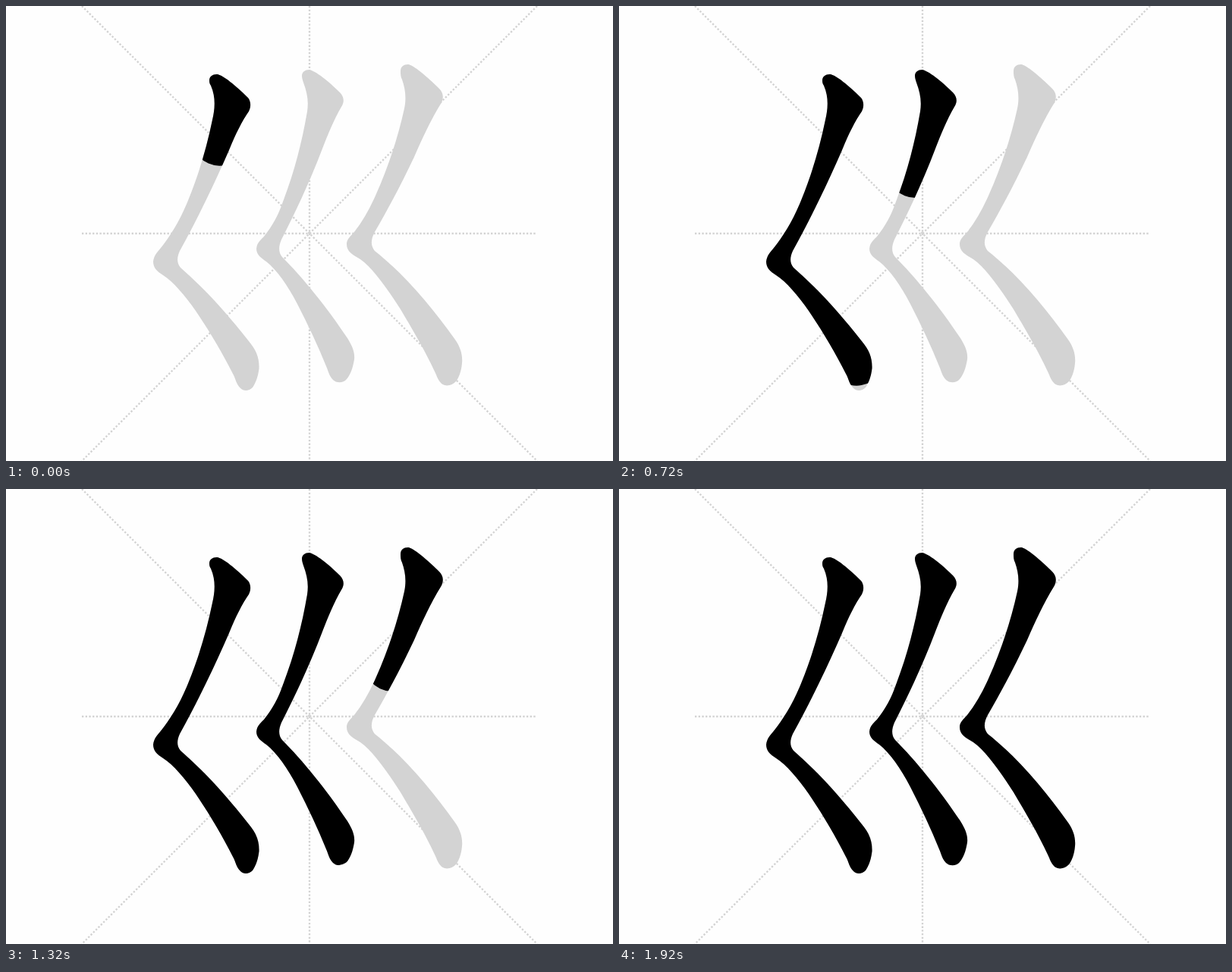
An HTML page for the animation above (1.98 s loop, 800 by 600 pixels).

```html
<!DOCTYPE html>
<html lang="en">
<head>
<meta charset="utf-8">
<title>Stroke order</title>
<style>
  html, body { margin: 0; width: 100%; height: 100%; overflow: hidden; background: #fefefe; }
  svg { display: block; width: 800px; height: 600px; }
  .guides { fill: none; stroke: #d3d3d3; stroke-width: 2.344; stroke-dasharray: 2.34375; }
  .shapes { fill: #d3d3d3; }

  /* Each brush runs along a stroke's spine and is clipped to its outline. */
  .brush {
    fill: none;
    stroke: #000;
    stroke-width: 75;
    stroke-linecap: round;
    stroke-linejoin: round;
    stroke-dasharray: 100 300;
    animation: 1980ms -2ms infinite;
  }
  .first { animation-name: first; }
  .second { animation-name: second; }
  .third { animation-name: third; }

  /* One step is 1/33 of the loop; a whole stroke takes 16 steps. */
  @keyframes first {
    0% { stroke-dashoffset: 81.25; animation-timing-function: steps(13); }
    39.3939%, 100% { stroke-dashoffset: 0; }
  }
  @keyframes second {
    0% { stroke-dashoffset: 100.02; }
    21.2121% { stroke-dashoffset: 100.02; animation-timing-function: steps(16); }
    69.697%, 100% { stroke-dashoffset: 0; }
  }
  @keyframes third {
    0% { stroke-dashoffset: 100.02; }
    51.5152% { stroke-dashoffset: 100.02; animation-timing-function: steps(16); }
    100% { stroke-dashoffset: 0; }
  }
</style>
</head>
<body>
<svg viewBox="0 0 800 600">
  <defs>
    <path id="left" d="M268 98C268 93 272 90 278 90C286 91 303 105 319 121C323 126 323 133 320 139
      C311 152 303 168 294 190C275 234 252 281 229 323C225 332 225 339 230 345
      C263 374 291 405 320 442C330 454 334 464 333.5 478C332 490 329 497 325 503
      C320 508 313 508 309 504C303 498 303 492 299 485C284 455 267 427 250 402
      C236 382 221 364 207 355C199 350 194 345 194 337C195 329 199 325 204 319
      C216 304 228 285 238.5 260C253 225 264 189 272 150C275 137 277 121 270 105C268 102 268 100 268 98Z"/>
    <path id="middle" d="M390 92C390 87 394 84 400 84C408 86 424 98 440 114C446 120 446 127 442 133
      C432 150 424 170 417 188C401 230 383 269 363 308C359 317 359 325 364 331
      C391 358 422 396 450 438C456 448 460 456 459 466C457 478 454 486 449 492
      C444 498 435 497 431 493C426 488 425 482 422 475C411 448 398 420 384 393
      C371 368 357 348 343 337C336 332 330 328 330 320C331 312 335 309 340 304
      C351 290 359 276 365 258C380 219 390 180 397 139C399 126 397 114 392 101C391 98 390 95 390 92Z"/>
    <path id="right" d="M520 86C520 80 524 77 530 77C537 78 554 92 571 109C577 115 577 122 573 129
      C560 150 548 176 538 199C522 233 504 267 486 298C481 307 480 316 486 323
      C523 352 560 395 592 440C599 450 602 460 601 471C600 482 597 490 593 495
      C588 501 579 502 574 498C569 493 568 488 565 482C552 454 536 427 520 400
      C504 375 484 346 467 334C457 328 449 324 449 314C449 307 454 304 459 298
      C470 284 479 268 487 250C504 212 517 172 525 135C528 121 526 108 522 97C520 93 520 90 520 86Z"/>
    <clipPath id="clip-left"><use href="#left"/></clipPath>
    <clipPath id="clip-middle"><use href="#middle"/></clipPath>
    <clipPath id="clip-right"><use href="#right"/></clipPath>
  </defs>

  <g class="guides">
    <path d="M100 0L700 600"/>
    <path d="M700 0L100 600"/>
    <path d="M400 0V600"/>
    <path d="M100 300H700"/>
  </g>

  <g class="shapes">
    <use href="#left"/>
    <use href="#middle"/>
    <use href="#right"/>
  </g>

  <g clip-path="url(#clip-left)">
    <path class="brush first" pathLength="100" d="M276 97L297 132L282 173L212 332L242 372L313 463L318 491"/>
  </g>
  <g clip-path="url(#clip-middle)">
    <path class="brush second" pathLength="100" d="M396 89L411 112L419 131L392 213L349 317L378 364L425 440L441 485"/>
  </g>
  <g clip-path="url(#clip-right)">
    <path class="brush third" pathLength="100" d="M528 88L546 113L551 128L509 229L470 312L486 340L604 526"/>
  </g>
</svg>
</body>
</html>
```
